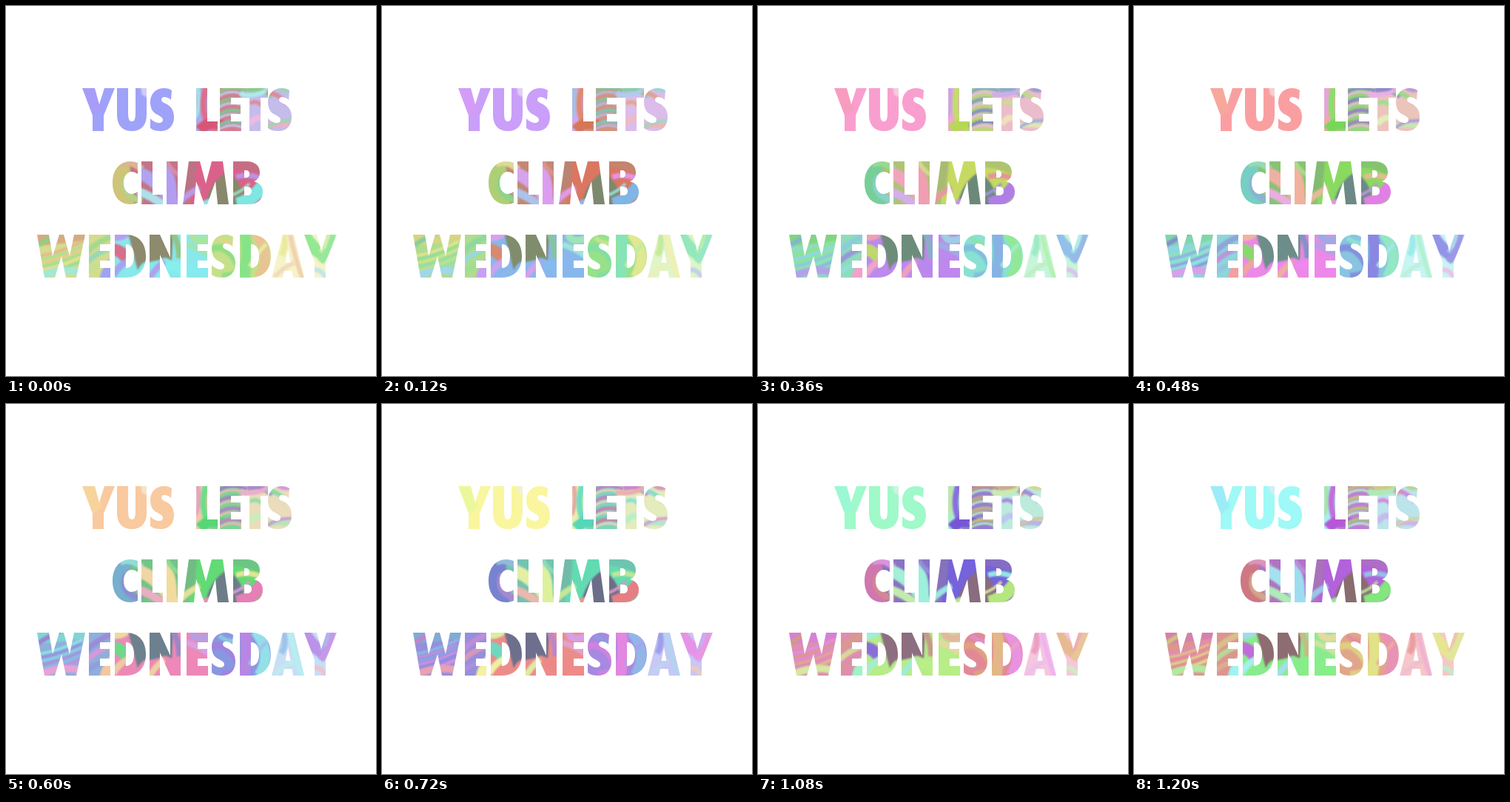
An HTML page with a canvas that plays this animation: 500x500 px, repeating every 1320 ms.

```html
<!DOCTYPE html>
<html lang="en">
<head>
<meta charset="utf-8">
<title>Yus lets climb Wednesday</title>
<style>
html, body { margin: 0; width: 100%; height: 100%; overflow: hidden; background: #fff; }
canvas { display: block; }
</style>
</head>
<body>
<canvas id="stage" width="500" height="500" role="img" aria-label="YUS LETS CLIMB WEDNESDAY"></canvas>
<script>
const STEP = 120, STEPS = 11, TURN = 30;
const ctx = document.getElementById('stage').getContext('2d');

// Heavy condensed capitals, 58 units tall
const glyphs = {
  A: 'M15 0H30L44 58H29L27.500 49H17L15 58H0ZM18.500 38H25.500L22 20Z',
  B: 'M0 0H18C31 0 36 7 36 15C36 21 33 25 28 27C36 29 40 34 40 41C40 52 33 58 20 58H0ZM15 12V22H17Q22 22 22 17T17 12ZM15 34V46H18Q25 46 25 40T18 34Z',
  C: 'M34 2V17Q30 14 26 14C19 14 15 21 15 29S19 44 26 44Q30 44 34 41V56Q29 58 24 58C9 58 0 46 0 29S9 0 24 0Q29 0 34 2Z',
  D: 'M0 0H15C33 0 42 12 42 29S33 58 15 58H0ZM15 13V45C23 45 26 38 26 29S23 13 15 13Z',
  E: 'M0 0H29V13H15V22H28V35H15V45H29V58H0Z',
  I: 'M0 0H15V58H0Z',
  L: 'M0 0H15V45H29V58H0Z',
  M: 'M8 0H23L31 30L39 0H54L62 58H47L44 27L33 58H29L18 27L15 58H0Z',
  N: 'M0 0H14L28 31V0H42V58H28L14 27V58H0Z',
  S: 'M29 3L28 16C25 13 22 12 19 12C16 12 15 14 15 16C15 18 17 19 21 21C29 25 32 31 32 39C32 51 25 58 14 58C8 58 4 57 0 54V41C4 45 8 47 12 47C15 47 17 45 17 43C17 40 15 39 10 36C3 33 0 27 0 19C0 7 8 0 19 0C23 0 26 1 29 3Z',
  T: 'M0 0H36V13H26V58H11V13H0Z',
  U: 'M0 0H15V35Q15 45 20 45T25 35V0H40V36C40 50 33 58 20 58S0 50 0 36Z',
  W: 'M0 0H16L21 29L30 0H36L44 29L50 0H65L53 58H39L33 29L24 58H10Z',
  Y: 'M0 0H17L23 22L30 0H44L29 37V58H14V37Z'
};

const letters = new Path2D();
function setLine(text, y, xs) {
  [...text].forEach((ch, i) =>
    letters.addPath(new Path2D(glyphs[ch]), new DOMMatrix([1, 0, 0, 1, xs[i], y])));
}
setLine('YUSLETS', 111, [103, 150, 195, 257, 289, 318, 354]);
setLine('CLIMB', 210, [144, 183, 217, 239, 307]);
setLine('WEDNESDAY', 309, [42, 112, 147, 194, 244, 278, 316, 359, 403]);

let hue = 0;
const tint = (h, s, l) => `hsl(${h + hue} ${s}% ${l}%)`;
function fill(h, s, l, d) {
  ctx.fillStyle = tint(h, s, l);
  ctx.fill(new Path2D(d));
}
function ribbon(h, s, l, width, d) {
  ctx.strokeStyle = tint(h, s, l);
  ctx.lineWidth = width;
  ctx.stroke(new Path2D(d));
}

function paintTop() {
  fill(238, 88, 80, 'M95 105H236V175H95Z');
  fill(247, 85, 79, 'M100 105H120L130 139 117 150Z');
  fill(245, 60, 88, 'M181 105H192V124L184 120Z');

  fill(240, 65, 80, 'M250 105H278V175H250Z');
  fill(345, 50, 66, 'M276 105H320V175H276Z');
  fill(250, 55, 83, 'M318 105H395V175H318Z');
  ribbon(185, 55, 77, 6, 'M258 107Q264 132 256 150');
  ribbon(345, 62, 65, 8, 'M271 108Q262 135 272 158');
  ribbon(345, 62, 59, 15, 'M262 168Q277 152 294 163');
  // Leafy fan across the middle letters
  for (let i = 0; i < 4; i++) {
    const y = 110 + i * 15;
    ribbon(110 + i * 12, 32, 64, 5, `M286 ${y + 8}Q302 ${y - 5} 326 ${y + 5}`);
    ribbon(210, 60, 83, 3, `M286 ${y + 13}Q304 ${y} 326 ${y + 12}`);
  }
  ribbon(120, 38, 67, 8, 'M326 114Q346 108 360 122');
  ribbon(180, 60, 80, 6, 'M316 119Q340 124 356 111');
  ribbon(350, 60, 71, 5, 'M330 132Q339 125 350 139');
  ribbon(315, 60, 83, 8, 'M329 160Q340 145 349 155');
  ribbon(350, 50, 70, 6, 'M352 116Q368 118 380 132');
  ribbon(150, 40, 72, 6, 'M367 110Q378 117 388 111');
  ribbon(335, 50, 80, 7, 'M354 162Q367 158 387 163');
  ribbon(130, 40, 73, 4, 'M352 166Q365 153 388 155');
}

function paintMiddle() {
  fill(345, 40, 61, 'M138 204H250V274H138Z');
  fill(340, 62, 62, 'M248 204H352V274H248Z');
  fill(52, 48, 64, 'M138 204H166L174 274H138Z');
  ribbon(85, 45, 68, 9, 'M163 230C155 246 162 258 184 264');
  ribbon(28, 50, 72, 9, 'M154 214Q168 207 184 221');
  ribbon(250, 70, 79, 17, 'M180 226Q205 234 229 272');
  ribbon(190, 60, 80, 11, 'M178 250Q200 258 216 272');
  ribbon(255, 75, 78, 14, 'M212 214Q229 240 222 272');
  ribbon(335, 50, 70, 6, 'M216 208Q224 224 234 228');
  ribbon(345, 35, 59, 16, 'M250 209Q248 232 246 250');
  ribbon(265, 60, 75, 8, 'M236 264Q249 251 262 246');
  fill(55, 12, 48, 'M268 274Q274 240 296 226Q318 229 326 274Z');
  ribbon(185, 62, 74, 8, 'M262 272Q273 262 284 264');
  ribbon(345, 42, 60, 12, 'M302 212Q325 212 344 222');
  ribbon(268, 62, 74, 7, 'M311 231Q329 226 346 234');
  ribbon(178, 67, 70, 18, 'M312 268Q334 263 349 240');
  ribbon(150, 50, 73, 4, 'M304 256Q319 251 329 240');
}

function paintLeft() {
  fill(65, 52, 71, 'M36 303H145V373H36Z');
  ribbon(30, 50, 67, 15, 'M38 316Q64 316 108 309');
  ribbon(110, 45, 66, 6, 'M40 325Q62 312 74 306');
  for (let i = 0; i < 3; i++) {
    const y = 332 + i * 10;
    ribbon(30 + i * 14, 62, 72, 4, `M44 ${y + 6}Q68 ${y + 3} 104 ${y - 14}`);
    ribbon(95 + i * 14, 55, 72, 4, `M44 ${y + 11}Q70 ${y + 7} 102 ${y - 7}`);
  }
  ribbon(165, 60, 77, 10, 'M48 365Q72 354 98 359');
  ribbon(100, 50, 70, 8, 'M108 334Q123 318 146 310');
  ribbon(150, 45, 72, 7, 'M110 346Q126 330 146 327');
  fill(238, 80, 79, 'M126 373Q128 350 148 334V373Z');
  ribbon(80, 55, 72, 7, 'M110 360Q124 349 134 350');
}

function paintRight() {
  fill(182, 72, 73, 'M143 303H278V373H143Z');
  ribbon(255, 68, 78, 10, 'M143 312Q155 314 165 306');
  ribbon(345, 58, 64, 16, 'M144 329Q158 330 166 346');
  ribbon(240, 70, 79, 9, 'M145 364Q154 348 168 344');
  fill(55, 13, 49, 'M164 303H226L224 344Q214 337 208 343L194 346Q184 343 178 357Z');
  ribbon(250, 65, 78, 8, 'M192 371Q201 355 214 345');
  ribbon(110, 35, 65, 8, 'M225 305Q235 324 234 341');
  ribbon(180, 75, 73, 12, 'M218 352Q235 347 243 369');
  ribbon(110, 58, 76, 10, 'M252 307Q254 323 278 313');
  ribbon(140, 55, 76, 8, 'M244 322Q264 329 279 341');
  ribbon(182, 75, 73, 14, 'M242 356Q259 349 278 364');

  fill(80, 60, 71, 'M277 303H362V373H277Z');
  ribbon(110, 58, 69, 9, 'M277 329Q294 320 309 342T292 365');
  ribbon(50, 60, 72, 6, 'M288 313Q303 325 313 318');
  ribbon(122, 62, 71, 15, 'M322 305Q329 330 321 372');
  ribbon(35, 65, 74, 14, 'M337 307Q361 337 342 367');
  ribbon(65, 65, 78, 5, 'M329 352Q344 328 352 322');

  fill(58, 70, 87, 'M358 303H455V373H358Z');
  ribbon(60, 65, 77, 8, 'M375 309Q380 324 372 337');
  ribbon(28, 70, 82, 6, 'M384 309Q390 340 401 369');
  ribbon(35, 60, 84, 6, 'M363 366Q376 352 390 347');
  ribbon(118, 65, 74, 17, 'M402 307Q414 330 434 339');
  ribbon(125, 62, 75, 9, 'M425 346Q438 330 442 307');
  ribbon(85, 65, 80, 5, 'M425 333Q433 320 436 307');
  ribbon(190, 50, 84, 6, 'M413 358Q424 352 433 368');
}

function draw(step) {
  hue = step * TURN;
  ctx.clearRect(0, 0, 500, 500);
  ctx.filter = 'blur(1.2px)';
  paintTop();
  paintMiddle();
  paintLeft();
  paintRight();
  ctx.filter = 'none';
  ctx.globalCompositeOperation = 'destination-in';
  ctx.fillStyle = '#000';
  ctx.fill(letters, 'evenodd');
  ctx.globalCompositeOperation = 'source-over';
}

const start = performance.now();
let shown = -1;
function tick() {
  const step = Math.floor((performance.now() - start) / STEP) % STEPS;
  if (step !== shown) draw(shown = step);
  requestAnimationFrame(tick);
}
tick();
</script>
</body>
</html>
```
